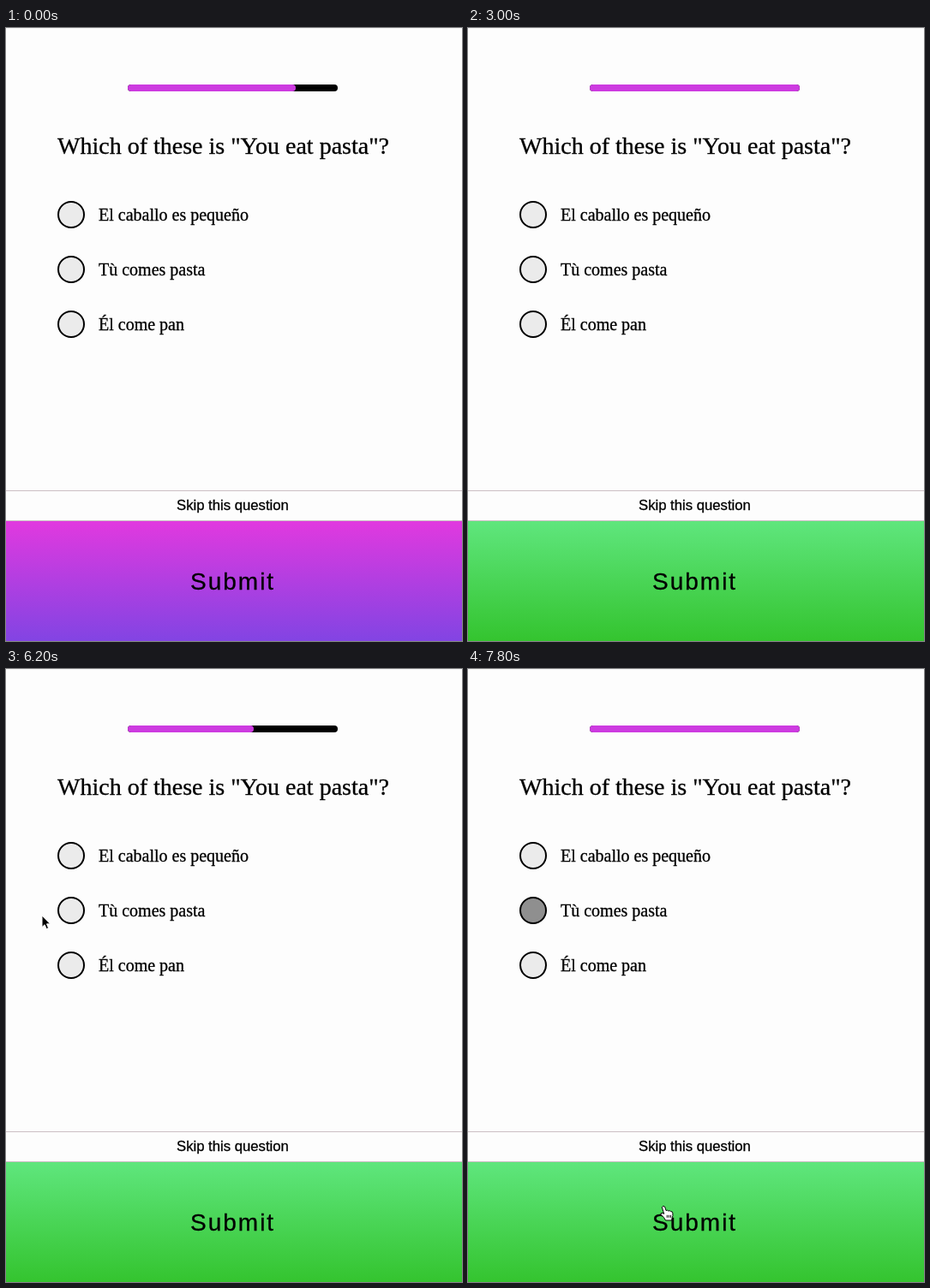
Write an HTML page that moves like this. It is 532 px wide and 716 px high and loops after 8 s.

```html
<!DOCTYPE html>
<html lang="en">
<head>
<meta charset="utf-8">
<title>Quiz</title>
<style>
  html, body { margin: 0; width: 100%; height: 100%; overflow: hidden; background: #fdfdfd; }
  svg { display: block; width: 532px; height: 716px; }
  text { stroke: #000; stroke-width: .3px; }
  .serif { font-family: "Liberation Serif", "Times New Roman", serif; }
  .sans { font-family: "Liberation Sans", Arial, sans-serif; }
</style>
</head>
<body>
<svg viewBox="0 0 532 716">
  <defs>
    <linearGradient id="purple" x2="0" y2="1"><stop stop-color="#e139df"/><stop offset="1" stop-color="#8244e3"/></linearGradient>
    <linearGradient id="lime" x2="0" y2="1"><stop stop-color="#cef15e"/><stop offset="1" stop-color="#c7f72f"/></linearGradient>
    <linearGradient id="green" x2="0" y2="1"><stop stop-color="#5fe67d"/><stop offset="1" stop-color="#34c42f"/></linearGradient>
  </defs>
  <rect width="532" height="1" fill="#f5f5f5"/>
  <rect x="142" y="66" width="245" height="8" rx="4"/>
  <rect id="bar" x="142" y="66" height="8" rx="4" fill="#cd3be0"/>

  <g class="serif">
    <text x="60" y="147" font-size="28">Which of these is "You eat pasta"?</text>
    <g id="options" font-size="20"></g>
  </g>

  <rect id="skip" y="540" width="532" height="36"/>
  <path d="M0 540.5H532M0 575.5H532" stroke="#cbbfc4"/>
  <rect id="submit" y="576" width="532" height="140"/>
  <g class="sans">
    <text x="199" y="563" font-size="16.7">Skip this question</text>
    <text x="215" y="656" font-size="28" letter-spacing="2">Submit</text>
  </g>

  <g id="cursor" stroke-linejoin="round">
    <path id="arrow" d="M0 0V13.5L3.1 10.7L5.2 15.6L7.6 14.6L5.5 9.8H9.6Z" stroke="#fff"/>
    <path id="hand" fill="#fff" stroke="#000" d="M-2.7.6Q-1.2-1.9.6.1L2.1 4.6Q3.7 3.6 4.8 5Q6.5 4.2 7.5 5.6Q9.5 5.2 9.8 7.4Q10.5 10.5 9 13.3L8.7 16H1.6Q0 12.6-3.8 9.4Q-4.6 7-2 7.4L-.3 8.4ZM3.3 9.8V12.8M5.4 9.8V12.8M7.5 9.8V12.8"/>
  </g>
</svg>
<script>
const LOOP = 8000, STEP = 200, FADE = 320, FILL = 120;
const $ = id => document.getElementById(id);

// Pointer stops: time, place and, where it clicks, the option picked or the bar level after submitting.
const stops = [
  { t: 200, x: 390, y: 470 },
  { t: 980, x: 78, y: 286, pick: 1 },
  { t: 1600, x: 137, y: 623 },
  { t: 1980, x: 215, y: 640, level: 100 },
  { t: 2400, x: 215, y: 740 },
  { t: 3100, x: 60, y: 740 },
  { t: 3944, x: 74, y: 350, pick: 2 },
  { t: 4200, x: 72, y: 364 },
  { t: 4780, x: 285, y: 645, level: 60 },
  { t: 5400, x: 295, y: 640 },
  { t: 6200, x: 42, y: 288 },
  { t: 6850, x: 78, y: 284, pick: 1 },
  { t: 7400, x: 233, y: 568 },
  { t: 7680, x: 229, y: 628, level: 100 },
];
const NEXT_QUESTION = { t: 3300, level: 80 };

const picks = stops.filter(s => "pick" in s);
const submits = stops.filter(s => "level" in s);
const levels = [...submits, NEXT_QUESTION].sort((a, b) => a.t - b.t);

$("options").innerHTML = ["El caballo es pequeño", "Tù comes pasta", "Él come pan"].map((label, i) =>
  `<circle cx="76" cy="${218 + 64 * i}" r="15" stroke="#000" stroke-width="2"/>
   <text x="108" y="${225 + 64 * i}">${label}</text>`).join("");
const dots = document.querySelectorAll("circle");

const clamp = v => Math.max(0, Math.min(1, v));
const mix = (a, b, p) => a + (b - a) * p;
const smooth = p => p * p * (3 - 2 * p);
const fade = ms => 1 - (1 - clamp(ms / FADE)) ** 2;

function pointer(t) {
  const b = stops.find(s => s.t > t) ?? stops.at(-1);
  const a = stops.findLast(s => s.t <= t) ?? b;
  const p = a === b ? 0 : smooth((t - a.t) / (b.t - a.t));
  return { x: mix(a.x, b.x, p), y: mix(a.y, b.y, p) };
}

function draw(t) {
  const shown = t >= stops[0].t;
  const { x, y } = pointer(t);
  const onSkip = shown && y > 540 && y < 576;
  const onSubmit = shown && y >= 576 && y < 716;
  // The button keeps focus from a submit until the next pick.
  const focused = submits.some((s, i) => t >= s.t && t < (picks[i + 1]?.t ?? LOOP));

  const level = levels.reduce((v, l) => mix(v, l.level, clamp((t - l.t) / FILL)), 80);
  $("bar").setAttribute("width", 245 * level / 100);
  $("skip").setAttribute("fill", onSkip ? "#e4e1e3" : "#fdfdfd");
  $("submit").setAttribute("fill", `url(#${focused ? "green" : onSubmit ? "lime" : "purple"})`);

  dots.forEach((dot, i) => {
    const on = picks.reduce((sum, p, n) =>
      p.pick === i ? sum + fade(t - p.t) - fade(t - submits[n].t) : sum, 0);
    const v = Math.round(235 * (1 - on));
    dot.setAttribute("fill", `rgb(${v},${v},${v})`);
  });

  const over = onSkip || onSubmit;
  $("cursor").setAttribute("transform", `translate(${x} ${y})`);
  $("cursor").setAttribute("visibility", shown ? "visible" : "hidden");
  $("hand").style.display = over ? "" : "none";
  $("arrow").style.display = over ? "none" : "";
}

const start = performance.now();
function tick(now) {
  const t = Math.max(0, now - start) % LOOP;
  draw(Math.floor(t / STEP) * STEP);
  requestAnimationFrame(tick);
}
draw(0);
requestAnimationFrame(tick);
</script>
</body>
</html>
```
